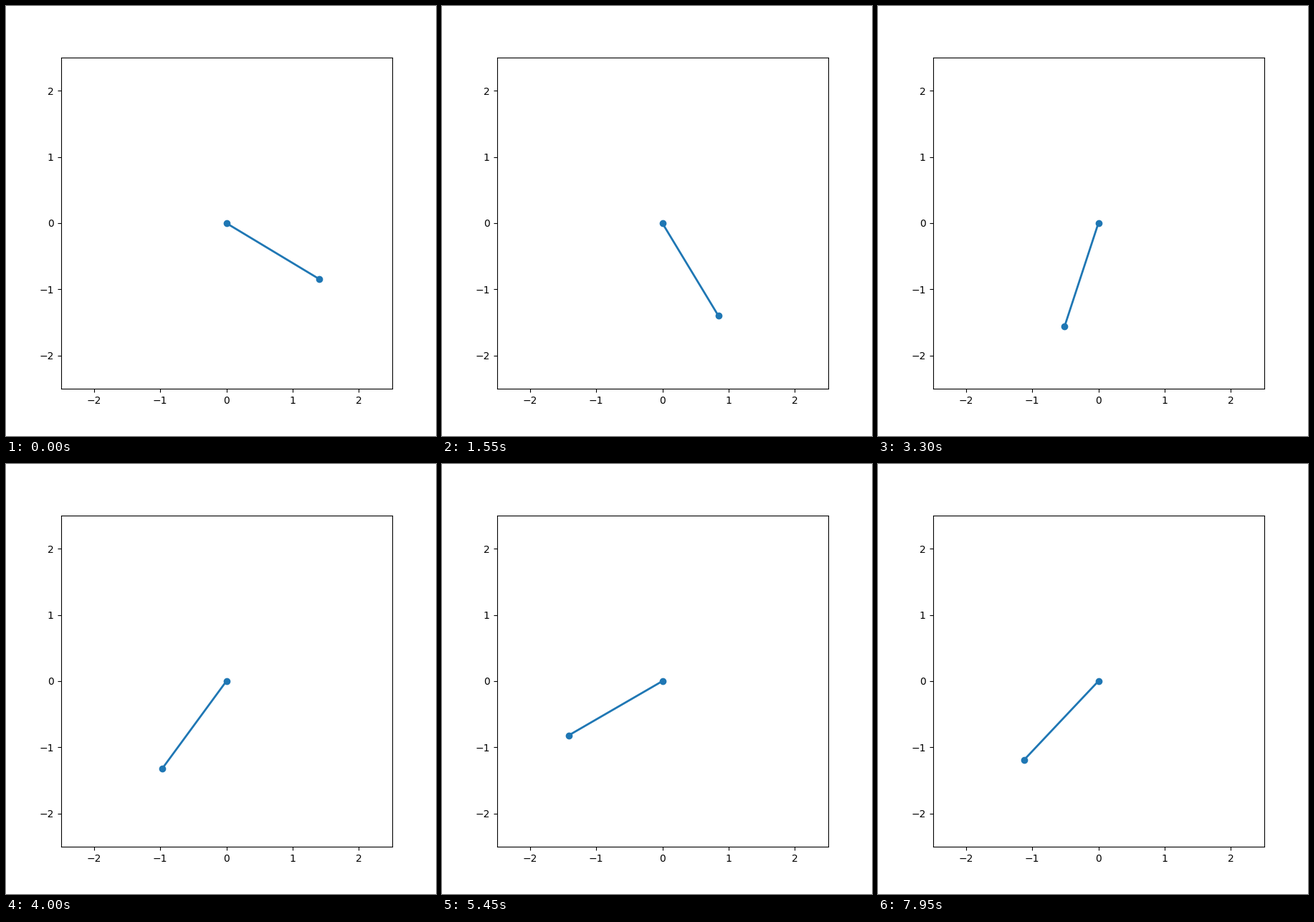
These frames come from a looping animation (600x600 px, 8000 ms). A matplotlib script:

```python
import numpy as np
import matplotlib.pyplot as plt
from matplotlib.animation import FuncAnimation

G = 9.81
LENGTH = 1.635
AMPLITUDE = np.radians(62.8)
DT = 0.01          # pendulum time per frame
SUBSTEPS = 10
LEAD = 159         # substeps between release and the first frame
FRAMES = 160


def swing():
    """Angle of a frictionless pendulum at every frame (leapfrog)."""
    h = DT / SUBSTEPS
    theta, omega = AMPLITUDE, 0.0
    angles = []
    for step in range(LEAD + FRAMES * SUBSTEPS):
        if step >= LEAD and (step - LEAD) % SUBSTEPS == 0:
            angles.append(theta)
        omega -= 0.5 * h * G / LENGTH * np.sin(theta)
        theta += h * omega
        omega -= 0.5 * h * G / LENGTH * np.sin(theta)
    return angles


angles = swing()

fig, ax = plt.subplots(figsize=(6, 6), dpi=100)
ax.set_xlim(-2.5, 2.5)
ax.set_ylim(-2.5, 2.5)
ax.set_aspect("equal")
rod, = ax.plot([], [], "o-", color="#1f77b4", lw=2)


def update(i):
    theta = angles[i]
    rod.set_data([0, LENGTH * np.sin(theta)], [0, -LENGTH * np.cos(theta)])
    return rod,


anim = FuncAnimation(fig, update, frames=FRAMES, interval=50, repeat=True,
                     repeat_delay=0)
plt.show()
```
